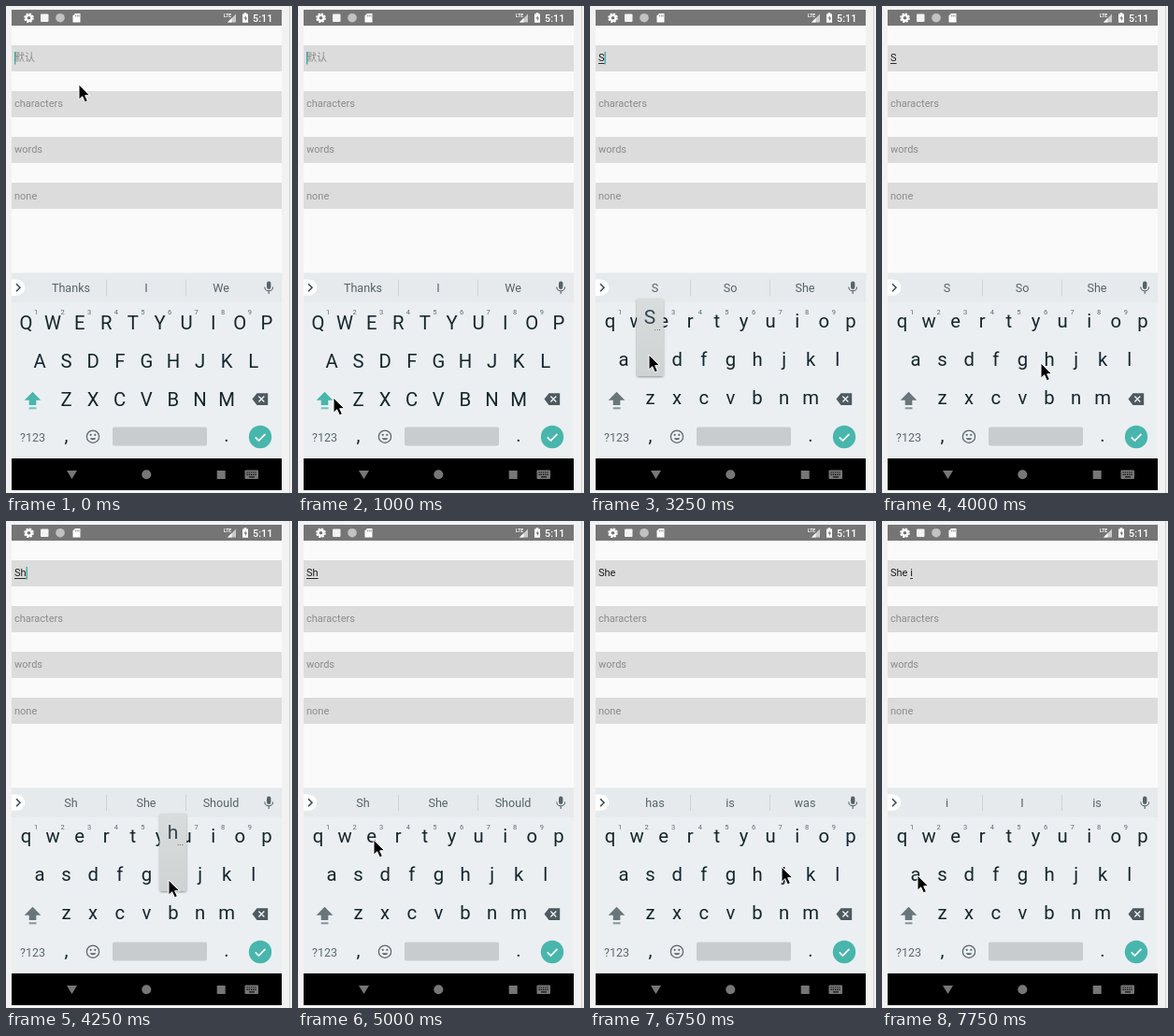
An HTML page that plays this animation: 306 by 521 pixels, repeating every 8000 ms.

```html
<!DOCTYPE html>
<html lang="en">
<head>
<meta charset="utf-8">
<title>Keyboard capitalisation</title>
<style>
html, body { margin: 0; width: 100%; height: 100%; overflow: hidden; background: #f1f2f1; }
svg { display: block; width: 306px; height: 521px; }
text { font-family: Roboto, "Noto Sans CJK SC", "Noto Sans CJK", sans-serif; white-space: pre; }
.mid { text-anchor: middle; }
.key { font-size: 20.3px; fill: #16262d; }
.digit { font-size: 7.5px; fill: #5f6b71; }
.word { font-size: 12.6px; fill: #566369; }
.field { font-size: 11px; }
</style>
</head>
<body>
<svg id="stage" viewBox="0 0 306 521">
  <defs>
    <linearGradient id="pop" x1="0" y1="0" x2="0" y2="1">
      <stop offset="0" stop-color="#d9dcdd"/>
      <stop offset="1" stop-color="#cfd2d3"/>
    </linearGradient>
    <filter id="soft" x="-30%" y="-20%" width="160%" height="140%">
      <feDropShadow dx="0" dy="1" stdDeviation="1.2" flood-opacity=".4"/>
    </filter>
  </defs>
  <rect width="306" height="521" fill="#f1f2f1"/>
  <rect x="303" width="1" height="521" fill="#d0d2d1"/>
  <rect x="6" y="4" width="289" height="514" fill="#fafafa"/>

  <g id="status">
    <rect x="6" y="4" width="289" height="17" fill="#757575"/>
    <circle cx="24.5" cy="12.7" r="3" fill="none" stroke="#fff" stroke-width="2.4"/>
    <circle cx="24.5" cy="12.7" r="4.6" fill="none" stroke="#fff" stroke-width="1.5" stroke-dasharray="2.1 1.51"/>
    <rect x="37" y="8.5" width="8.5" height="8.5" rx="1" fill="#f3f3f3"/>
    <circle cx="58" cy="12.7" r="4.8" fill="#c2c2c2"/>
    <path d="M74 8h5.5v9.5h-8v-7z" fill="#fff"/>
    <path d="M74.3 9.5v2M76.2 9.5v2M78 9.5v2" stroke="#757575" stroke-width=".8"/>
    <text x="233" y="12" font-size="5" font-weight="700" fill="#fff">LTE</text>
    <path d="M246 8.5v9h-9z" fill="#c9c9c9"/>
    <path d="M241.5 13v4.5h-4.5z" fill="#fff"/>
    <path d="M254.7 7.2h2.6v1.2h1.7v9.4h-6v-9.4h1.7z" fill="#fff"/>
    <path d="M256.6 10l-2 3.5h1.4v2.7l2-3.6h-1.4z" fill="#757575"/>
    <text x="264" y="16.7" font-size="10.8" font-weight="500" fill="#fff">5:11</text>
  </g>

  <g id="fields"></g>
  <text id="typed" class="field" x="9" y="59.3" fill="#1b1b1b"></text>
  <rect id="line" y="61" height="1" fill="#2b2b2b"/>
  <rect id="caret" y="49" width="1.3" height="13.5" fill="#35a79c"/>

  <rect x="6" y="285.5" width="289" height="32" fill="#e6eaed"/>
  <rect x="6" y="317" width="289" height="167" fill="#ebeff1"/>
  <path d="M107.5 293v17M192.5 293v17" stroke="#cdd3d6"/>
  <path d="M6 292.5h5.5a8.7 8.7 0 0 1 0 17.4h-5.5z" fill="#fff"/>
  <path d="M11 297.3l4 4-4 4" fill="none" stroke="#37474f" stroke-width="1.5"/>
  <g id="words"></g>
  <g id="mic" fill="#566369">
    <rect x="279" y="294.5" width="4.4" height="8.4" rx="2.2"/>
    <path d="M276.8 300.5a4.4 4.4 0 0 0 8.8 0M281.2 305v3" fill="none" stroke="#566369" stroke-width="1.1"/>
  </g>

  <g id="keys"></g>
  <g id="shift">
    <path d="M28.5 412.8l8.8 9h-5v5.2h-7.6v-5.2h-5z"/>
    <rect x="24.7" y="429.3" width="7.8" height="2" opacity=".75"/>
  </g>
  <path d="M268.5 414.3h11.7v12.6h-11.7l-5-6.3z" fill="#4d5a60"/>
  <path d="M270.3 417.6l6 6M276.3 417.6l-6 6" stroke="#ebeff1" stroke-width="1.4"/>
  <text class="mid" x="28.5" y="465.5" font-size="12.5" fill="#5b686e">?123</text>
  <text class="key mid" x="64.5" y="466">,</text>
  <text class="key mid" x="236" y="466">.</text>
  <g fill="none" stroke="#566369" stroke-width="1.2">
    <circle cx="93" cy="460.7" r="6.6"/>
    <path d="M89.6 462.3a3.6 3 0 0 0 6.8 0z" fill="#566369" stroke="none"/>
    <circle cx="90.7" cy="458.8" r=".5"/><circle cx="95.3" cy="458.8" r=".5"/>
  </g>
  <rect x="114" y="450.5" width="101" height="20" rx="2" fill="#c8cccf"/>
  <circle cx="272" cy="461" r="12.2" fill="#48b6ac"/>
  <path d="M266.8 461.4l3.6 3.6 7-7.2" fill="none" stroke="#fff" stroke-width="1.7"/>

  <rect x="6" y="484" width="289" height="34" fill="#000"/>
  <g fill="#767676">
    <path d="M65 497h11l-5.5 9z"/>
    <circle cx="150.3" cy="501.3" r="5"/>
    <rect x="225.7" y="497" width="9" height="9"/>
    <rect x="255.5" y="496.5" width="14.5" height="9.5" rx="1"/>
    <path d="M257.5 499h11M257.5 501.4h11" stroke="#000" stroke-width="1.2" stroke-dasharray="1.2 1"/>
    <path d="M260 503.9h6" stroke="#000" stroke-width="1.1"/>
  </g>

  <g id="popup">
    <rect x="-14" y="-74" width="28.5" height="83" rx="2" fill="url(#pop)" filter="url(#soft)"/>
    <text id="big" class="mid" y="-47" font-size="21" fill="#37474f"></text>
    <text id="more" x="4.5" y="-40" font-size="9" fill="#37474f">...</text>
  </g>
  <path id="arrow" d="M0 0v16.2l3.7-3.4 2.7 6 3-1.3-2.7-5.8h5z" fill="#000" stroke="#fff" stroke-width="1"/>
</svg>
<script>
const LOOP = 8000, STEP = 250;
const $ = id => document.getElementById(id);

function add(parent, tag, attrs, label) {
  const el = document.createElementNS("http://www.w3.org/2000/svg", tag);
  for (const k in attrs) el.setAttribute(k, attrs[k]);
  if (label) el.textContent = label;
  return $(parent).appendChild(el);
}

// Input rows
const hints = ["默认", "characters", "words", "none"].map((s, i) => {
  const y = 42 + i * 49.1;
  add("fields", "rect", { x: 6, y: Math.round(y), width: 289, height: 28, fill: "#dcdcdc" });
  return add("fields", "text", { class: "field", x: 9, y: y + 17.2, fill: "#8b8b8b" }, s);
});

const slots = [69.5, 150, 230].map(x => add("words", "text", { class: "word mid", x, y: 306 }));

// Letter keys
const keys = {};
[["qwertyuiop", 21.5, 346], ["asdfghjkl", 36, 387], ["zxcvbnm", 64.5, 428]].forEach(([row, x0, y], r) => {
  [...row].forEach((c, i) => {
    const x = x0 + i * 28.6;
    keys[c] = { x, y, el: add("keys", "text", { class: "key mid", x }) };
    if (!r) add("keys", "text", { class: "digit mid", x: x + 10.5, y: 329.5 }, (i + 1) % 10);
  });
});

// Each entry: time, text, start of the underlined part, suggestions, pressed key
const typing = [
  [-250, "", 0, "Thanks,I,We", ""],
  [3250, "S", 0, "S,So,She", "S"],
  [4250, "Sh", 0, "Sh,She,Should", "h"],
  [5250, "She", 0, "She,She's,Sheet", "e"],
  [6250, "She ", 4, "has,is,was", ""],
  [7000, "She i", 4, "i,I,is", "i"]
];

// Pointer stops: time, x, y
const path = [
  [0, 78, 84], [250, 76, 130], [750, 34, 421], [1000, 38, 419], [1250, 70, 404],
  [2000, 70, 404], [2250, 109, 394], [2500, 104, 391], [3000, 63, 373], [3250, 63, 373],
  [4000, 170, 382], [4250, 174, 384], [4500, 172, 382], [5000, 81, 341], [5250, 80, 340],
  [5750, 146, 446], [6000, 161, 459], [6250, 161, 459], [7000, 221, 339], [7250, 208, 343],
  [7750, 38, 379]
];

function pointer(t) {
  const i = path.findIndex(p => p[0] >= t);
  if (i < 1) return path[i < 0 ? path.length - 1 : 0].slice(1);
  const [a, b] = [path[i - 1], path[i]];
  const u = (t - a[0]) / (b[0] - a[0]), k = u * u * (3 - 2 * u);
  return [1, 2].map(n => a[n] + (b[n] - a[n]) * k);
}

const show = (el, on) => el.setAttribute("visibility", on ? "visible" : "hidden");

function measure(s) {
  typed.textContent = s;
  return s ? typed.getComputedTextLength() : 0;
}

const typed = $("typed");
let last = -1;

function draw(ms) {
  const t = Math.floor(ms % LOOP / STEP) * STEP;
  if (t === last) return;
  last = t;

  const [since, text, from, words, pressed] = typing.filter(e => e[0] <= t).pop();
  const start = measure(text.slice(0, from)), end = measure(text);
  show(hints[0], !text);
  $("line").setAttribute("x", 9 + start);
  $("line").setAttribute("width", end - start);
  $("caret").setAttribute("x", 9 + end);
  show($("caret"), Math.floor((t - since) / 500) % 2 === 0);
  words.split(",").forEach((w, i) => slots[i].textContent = w);

  const upper = !text;
  for (const c in keys) {
    keys[c].el.textContent = upper ? c.toUpperCase() : c;
    keys[c].el.setAttribute("y", keys[c].y - (upper ? 0 : 2));
  }
  $("shift").setAttribute("fill", upper ? "#48b6ac" : "#69757a");

  const popped = pressed && t - since < STEP;
  show($("popup"), popped);
  if (popped) {
    const k = keys[pressed.toLowerCase()];
    $("popup").setAttribute("transform", `translate(${k.x - .5} ${k.y})`);
    $("big").textContent = pressed;
  }
  $("arrow").setAttribute("transform", `translate(${pointer(t).map(Math.round)})`);
}

function tick(now) {
  draw(now);
  requestAnimationFrame(tick);
}
draw(0);
requestAnimationFrame(tick);
</script>
</body>
</html>
```
